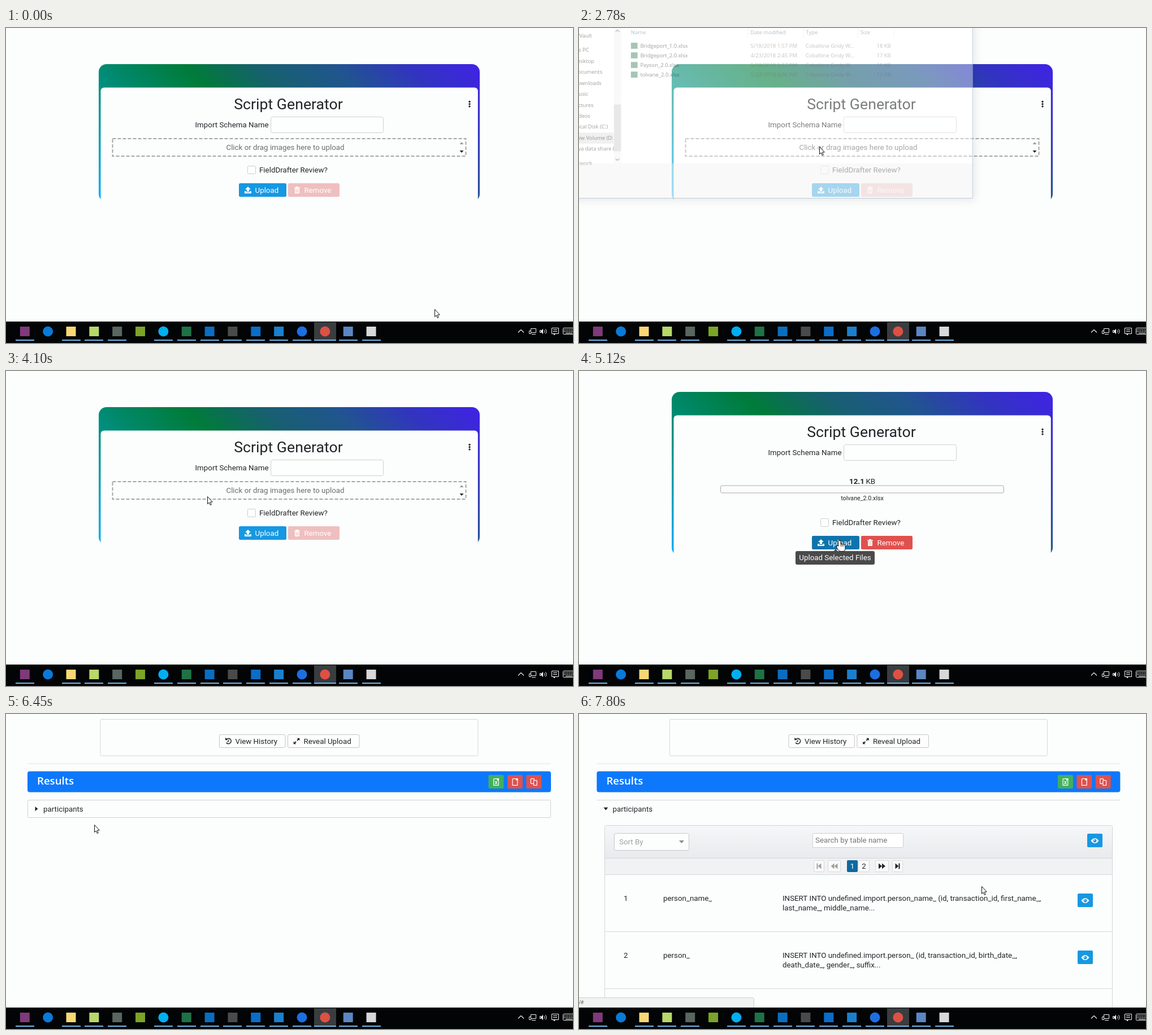
Animation, 1003 px wide and 558 px high, one loop 8 s. Source, as an HTML page with a canvas:

```html
<!DOCTYPE html>
<html lang="en">
<head>
<meta charset="utf-8">
<title>Script Generator</title>
<style>
html, body { margin: 0; width: 100%; height: 100%; overflow: hidden; background: #fcfefd; }
canvas { display: block; }
</style>
</head>
<body>
<canvas id="stage" width="1003" height="558"></canvas>
<script>
const g = document.getElementById('stage').getContext('2d');
const LOOP = 8000;
const ROBOTO = 'Roboto, sans-serif', UI = '"Open Sans", "Noto Sans", sans-serif';
const INK = '#212529', PAGE = '#fcfefd', BLUE = '#1698e2', RED = '#e0514e', GREEN = '#41b05c';
const FILE = 'tolvane_2.0.xlsx';

// moments of the story, in ms
const T = { dialog: 2780, hover: 3660, select: 3740, close: 3880, picked: 4120, tip: 5040,
  upload: 5340, done: 5640, row: 6560, link: 6830, expand: 7210 };

// cursor moves: when it starts and stops, where it goes, sideways bow, hand on arrival
const MOVES = [
  { from: 0, to: 1, x: 758, y: 498 },
  { from: 360, to: 1100, x: 817, y: 141, bow: -440, hand: true },
  { from: 1330, to: 1770, x: 426, y: 210, hand: true },
  { from: 2550, to: 2551, x: 426, y: 210 },
  { from: 2780, to: 3580, x: 140, y: 87 },
  { from: 3880, to: 4680, x: 520, y: 325 },
  { from: 4760, to: 5110, x: 461, y: 300, hand: true },
  { from: 5340, to: 5490, x: 654, y: 320 },
  { from: 5510, to: 5640, x: 641, y: 321 },
  { from: 6230, to: 6670, x: 61, y: 172, hand: true },
  { from: 7660, to: 7800, x: 712, y: 305 }
];

const clamp = v => Math.max(0, Math.min(1, v));
const mix = (a, b, k) => a + (b - a) * k;
const progress = (t, a, b) => clamp((t - a) / (b - a));
const easeOut = k => 1 - (1 - k) ** 2.6;

function text(s, x, y, { size = 13.34, color = INK, align = 'left', font = ROBOTO, weight = 400 } = {}) {
  g.font = `${weight} ${size}px ${font}`;
  g.fillStyle = color;
  g.textAlign = align;
  g.fillText(s, x, y);
}

function rect(x, y, w, h, color) {
  g.fillStyle = color;
  g.fillRect(x, y, w, h);
}

function box(x, y, w, h, r, fill, border, lw = 1) {
  const o = border ? lw / 2 : 0;
  g.beginPath();
  g.roundRect(x + o, y + o, w - 2 * o, h - 2 * o, r);
  if (fill) { g.fillStyle = fill; g.fill(); }
  if (border) { g.strokeStyle = border; g.lineWidth = lw; g.stroke(); }
}

function line(x0, y0, x1, y1, color, lw = 1) {
  g.beginPath();
  g.moveTo(x0, y0);
  g.lineTo(x1, y1);
  g.strokeStyle = color;
  g.lineWidth = lw;
  g.stroke();
}

function arc(x, y, r, a, b, color, lw = 1) {
  g.beginPath();
  g.arc(x, y, r, a, b);
  g.strokeStyle = color;
  g.lineWidth = lw;
  g.stroke();
}

function dot(x, y, r, color) {
  g.beginPath();
  g.arc(x, y, r, 0, 7);
  g.fillStyle = color;
  g.fill();
}

// triangle centred on x, y, pointing along quarter turns from right
function tri(x, y, turn, half, depth, color) {
  g.save();
  g.translate(x, y);
  g.rotate(turn * Math.PI / 2);
  g.beginPath();
  g.moveTo(-depth / 2, -half);
  g.lineTo(depth / 2, 0);
  g.lineTo(-depth / 2, half);
  g.fillStyle = color;
  g.fill();
  g.restore();
}

function chevron(x, y, turn, color = '#444', r = 3.5) {
  const d = turn === 3 ? -r / 2 : r / 2;
  line(x - r, y - d, x, y + d, color, 1.1);
  line(x, y + d, x + r, y - d, color, 1.1);
}

// icons are drawn around 0, 0
const icons = {
  upload() {
    tri(0, -3.5, 3, 5, 5, '#fff');
    rect(-2, -1, 4, 4, '#fff');
    rect(-6, 4, 12, 2, '#fff');
    for (const x of [-6, 3]) rect(x, 2, 3, 3, '#fff');
  },
  trash() {
    rect(-5, -4.5, 10, 1.6, '#fff');
    rect(-2, -6, 4, 2, '#fff');
    box(-4, -2.5, 8, 8.5, 1, '#fff');
    for (const x of [-2, 0, 2]) line(x, -1, x, 4.5, 'rgba(220,80,80,.5)', .8);
  },
  history() {
    arc(.5, 0, 4.7, -2.6, 2.5, INK, 1.6);
    tri(-4, -3, 1.5, 3, 3.5, INK);
    line(.5, -2.5, .5, 1, INK, 1.2);
    line(.5, .8, -1.8, .8, INK, 1.2);
  },
  expand() {
    for (const d of [-1, 1]) {
      line(d, -d, 4 * d, -4 * d, INK, 1.8);
      tri(4.2 * d, -4.2 * d, d > 0 ? -.5 : 1.5, 3.2, 3.2, INK);
    }
  },
  page() {
    box(-5, -6.5, 10, 13, 1, null, '#fff', 1.2);
    rect(1.5, -6.5, 3.5, 3.5, '#fff');
  },
  sheet() {
    icons.page();
    for (const d of [-2, 2]) line(-d, -2, d, 4, '#fff', 1.3);
  },
  copy() {
    box(-6, -6.5, 7, 10, 1, null, '#fff', 1.2);
    box(-1, -3.5, 7, 10, 1, RED, '#fff', 1.2);
  },
  eye() {
    g.beginPath();
    g.moveTo(-7, 0);
    g.quadraticCurveTo(0, -9, 7, 0);
    g.quadraticCurveTo(0, 9, -7, 0);
    g.fillStyle = '#fff';
    g.fill();
    dot(0, 0, 2.9, BLUE);
    dot(-1, -1, 1, '#fff');
  }
};

function icon(name, x, y) {
  g.save();
  g.translate(x, y);
  icons[name]();
  g.restore();
}

function iconButton(x, y, color, name) {
  box(x, y, 27, 24, 2, color);
  icon(name, x + 13.5, y + 12.5);
}

function labelButton(x, y, w, label, name, fill, color, border) {
  box(x, y, w, 24, 2.5, fill, border);
  icon(name, x + 16, y + 12);
  text(label, x + 28.5, y + 16.8, { color });
}

// 45 degree gradient across the card box
function cardFill(x, y, w, h) {
  const k = (w + h) / 4, cx = x + w / 2, cy = y + h / 2;
  const fill = g.createLinearGradient(cx - k, cy + k, cx + k, cy - k);
  const colors = ['#00adff', '#009ca4', '#00886a', '#007b39', '#17606f', '#20558e', '#3234c0', '#4022e6'];
  colors.forEach((c, i) => fill.addColorStop(i / (colors.length - 1), c));
  return fill;
}

function card(top, inner, bottom, mode, t) {
  const h = bottom - top, picked = mode === 'picked', closing = mode === 'closing';
  if (h <= 2) return;
  g.save();
  g.beginPath();
  g.rect(160, 0, 682, bottom);
  g.clip();
  box(164, top, 674, closing ? h + 20 : h, 14, cardFill(164, top, 674, h));
  box(167.5, inner + .6, 667.3, Math.max(20, h), 6, PAGE);
  g.translate(0, inner - 105);
  text('Script Generator', 499.5, 144, { size: 26.67, align: 'center' });
  for (const d of [-1, 0, 1]) dot(820, 134.7 + 4.2 * d, 1.7, INK);
  text('Import Schema Name', 334.5, 176);
  box(468, 157, 200, 29, 3, '#fdfefe', '#cfcfcf');
  if (picked) fileInfo(t); else dropZone(closing);
  if (picked) g.translate(0, 44);
  box(427, 244, 15, 15, 2, '#fff', '#cbcbcb');
  text('FieldDrafter Review?', 448, 256);
  labelButton(412, 275, 84, 'Upload', 'upload', picked && t >= T.tip ? '#1074ac' : BLUE, '#fff');
  labelButton(499, 275, 91, 'Remove', 'trash', picked ? RED : '#efbfbf', '#fff');
  g.restore();
}

function fileInfo(t) {
  text('12.1', 478, 227, { weight: 700 });
  text('KB', 507.5, 227);
  const s = mix(1.066, 1, progress(t, 4740, 4900));
  box(501 - 251 * s, 236.5 - 7 * s, 502 * s, 14 * s, 3, '#fcfcfc', '#a9a9a9');
  text(FILE, 501, 256, { size: 10.67, align: 'center' });
}

function dropZone(active) {
  if (active) rect(189, 196, 609, 31, '#ececec');
  g.setLineDash([6, 3]);
  box(187.5, 195, 627, 33, 0, null, '#a6a6a6', 2);
  g.setLineDash([]);
  text('Click or drag images here to upload', 494, 216, { color: '#6c6c6c', align: 'center' });
  tri(806, 204, 3, 3.5, 4, '#9a9a9a');
  tri(806, 219, 1, 3.5, 4, '#222');
}

function tooltip() {
  tri(454, 317.5, 3, 4, 4, '#4a4a4a');
  box(383, 319, 140, 24, 3, '#4a4a4a');
  text('Upload Selected Files', 453, 335, { color: '#fff', align: 'center' });
}

function pagerButton(x, w, back, end) {
  const c = x + w / 2, d = back ? -1 : 1, color = back ? '#a0a0a0' : INK;
  box(x, 259, w, 21, 2, '#fafafa', '#d8d8d8');
  for (const o of end ? [-d] : [-3, 3]) tri(c + o, 269.5, back ? 2 : 0, 5, 6, color);
  if (end) rect(c + 3 * d - 1, 264.5, 2, 10, color);
}

function table(reveal) {
  const rows = [
    ['person_name_', 'INSERT INTO undefined.import.person_name_ (id, transaction_id, first_name_,', 'last_name_, middle_name...'],
    ['person_', 'INSERT INTO undefined.import.person_ (id, transaction_id, birth_date_,', 'death_date_, gender_, suffix...'],
    ['', '', '']
  ];
  const head = g.createLinearGradient(0, 198, 0, 255);
  head.addColorStop(0, '#f6f7f8');
  head.addColorStop(1, '#e9eaed');
  g.save();
  g.beginPath();
  g.rect(0, 184, 1003, 336 * reveal);
  g.clip();
  box(45, 197, 899, 400, 2, PAGE, '#d2d4d6');
  rect(46, 198, 897, 57, head);
  rect(46, 255, 897, 30, '#f1f2f4');
  rect(45, 255, 899, 1, '#d4d6d8');
  box(62, 211, 133, 31, 3, '#fcfdfd', '#c8c8c8');
  text('Sort By', 71, 231, { color: '#a0a0a0' });
  tri(181.5, 226.5, 1, 4.5, 5, '#8b8b8b');
  box(413, 211, 161, 26, 2, '#fff', '#cfcfcf');
  text('Search by table name', 418, 228, { color: '#777' });
  iconButton(899, 212, BLUE, 'eye');
  pagerButton(415, 19, true, true);
  pagerButton(440, 23, true, false);
  box(474, 259, 19, 21, 2, '#10689f');
  text('1', 483.5, 274, { color: '#fff', align: 'center' });
  box(494, 259, 20, 21, 2, '#fafafa', '#d8d8d8');
  text('2', 504, 274, { align: 'center' });
  pagerButton(524, 24, false, false);
  pagerButton(554, 19, false, true);
  rows.forEach(([name, sql, more], i) => {
    const y = 284 + 101 * i;
    rect(45, y, 899, 1, '#d4d6d8');
    text(i + 1, 79, y + 47);
    text(name, 149, y + 47);
    text(sql, 360, y + 47);
    text(more, 360, y + 63.5);
    iconButton(882, y + 34, BLUE, 'eye');
  });
  g.restore();
}

function results(y, t) {
  const open = t >= T.expand, scrollbar = open || t < T.upload + 50;
  g.save();
  g.translate(scrollbar ? -6.6 : 0, y);
  box(166.5, 0, 669, 65.5, 2, PAGE, '#d6d6d6');
  labelButton(377, 27, 117.5, 'View History', 'history', '#fdfdfd', INK, '#c4c4c4');
  labelButton(498, 27, 127.5, 'Reveal Upload', 'expand', '#fdfdfd', INK, '#c4c4c4');
  rect(38, 78.5, 926, 1, '#e4e5e5');
  box(38, 92.5, 926, 37, 4, '#0e78fc');
  text('Results', 55, 115.5, { size: 18.6, color: '#fff', font: UI, weight: 600 });
  ['sheet', 'page', 'copy'].forEach((name, i) => iconButton(853.5 + 33.4 * i, 99, i ? RED : GREEN, name));
  if (open) rect(38, 143, 926, 1, '#d6d6d6');
  else box(38, 143, 926, 32, 2, t >= T.row ? '#f0f0f0' : '#fcfdfd', '#cfd0d0');
  tri(54, 159, open ? 1 : 0, 4, 5, INK);
  text('participants', 66, 163.5);
  g.restore();
  if (open) table(progress(t, T.expand - 60, T.expand + 200));
}

const ui = (s, x, y, color = '#111', align = 'left') => text(s, x, y, { size: 9.7, color, align, font: UI });

// the shadow stays outside the window, so a fading window is not darkened by it
function windowFrame(right, bottom) {
  g.save();
  g.beginPath();
  g.rect(-900, -900, 2800, 2800);
  g.rect(-200, -200, right + 200, bottom + 200);
  g.clip('evenodd');
  g.shadowColor = 'rgba(0,0,0,.2)';
  g.shadowBlur = 14;
  g.shadowOffsetX = g.shadowOffsetY = 4;
  rect(-200, -200, right + 200, bottom + 200, '#fff');
  g.restore();
  rect(-200, -200, right + 200, bottom + 200, '#fff');
}

function folders() {
  const groups = [
    ['SkyVault'],
    ['This PC', 'Desktop', 'Documents', 'Downloads', 'Music', 'Pictures', 'Videos',
      'Local Disk (C:)', 'New Volume (D:', 'Java data share ('],
    ['Network']
  ];
  rect(-200, 188, 254, 20, '#d9d9d9');
  let y = 15;
  for (const group of groups) {
    group.forEach((name, i) => { ui(name, i ? -18 : -23, y); y += 20; });
    y += 6;
  }
  rect(55, -20, 13, 264, '#f0f0f0');
  rect(55, 137, 13, 85, '#cdcdcd');
  chevron(61.5, 3, 3);
  chevron(61.5, 237, 1);
}

function files(t) {
  const cols = { 'Name': 86, 'Date modified': 303, 'Type': 404, 'Size': 503 };
  const list = [
    ['Bridgeport_1.0.xlsx', '5/18/2018 1:57 PM', '18 KB'],
    ['Bridgeport_2.0.xlsx', '4/23/2018 2:45 PM', '17 KB'],
    ['Payson_2.0.xlsx', '5/18/2018 1:57 PM', '11 KB'],
    [FILE, '5/22/2018 4:06 PM', '12 KB']
  ];
  for (const [name, x] of Object.entries(cols)) {
    ui(name, x, 9, '#536480');
    rect(x - 5, -5, 1, 21, x < 100 ? '#fff' : '#e4e4e4');
  }
  rect(564, -5, 1, 21, '#e4e4e4');
  if (t >= T.hover) rect(83, 73, 479, 18.5, t >= T.select ? '#cce8ff' : '#e5f3ff');
  list.forEach(([name, date, size], i) => {
    const y = 33.5 + 17.5 * i;
    rect(86, y - 9, 12, 11, '#217346');
    ui(name, 103, y);
    ui(date, 303.5, y, '#6d6d6d');
    ui('Cobaltine Gridy W...', 403.5, y, '#6d6d6d');
    ui(size, 558.5, y, '#6d6d6d', 'right');
  });
}

function fileControls(t) {
  ui('File name:', 91.5, 265, '#111', 'right');
  box(96, 251.5, 430, 20, 0, '#fff', '#0078d7');
  if (t >= T.select) ui(FILE, 100, 265);
  chevron(518, 262, 1);
  box(536, 251.5, 157, 19.5, 0, '#e3e3e3', '#adadad');
  ui('Custom Files', 539.5, 265);
  chevron(685, 261.5, 1);
  box(537, 276.5, 72, 20, 0, '#e1e1e1', '#0078d7', 2);
  ui('Open', 566.5, 290, '#111', 'center');
  rect(597, 279, 1, 15, '#333');
  tri(602.5, 287, 1, 4, 4.5, '#111');
  box(620, 276.5, 72, 20, 0, '#e1e1e1', '#adadad');
  ui('Cancel', 656, 290, '#111', 'center');
  for (let i = 0; i < 3; i++)
    for (let j = 0; j <= i; j++) rect(704 - 3 * j, 298.5 + 3 * i, 1.5, 1.5, '#b4b4b4');
}

function dialog(t) {
  const closing = t >= T.close;
  const alpha = closing ? 1 - progress(t, T.close - 20, T.picked - 40) : progress(t, T.dialog - 80, T.dialog + 120);
  const s = .955 + .045 * alpha;
  if (!alpha) return;
  g.save();
  g.globalAlpha = alpha;
  g.translate(305, 85);
  g.scale(s, s);
  g.translate(-305, -85);
  windowFrame(707.5, 308);
  folders();
  files(t);
  rect(-200, 244, 907, 64, '#f0f0f0');
  if (t >= T.dialog + 60) fileControls(t);
  box(-200, -200, 907.5, 508, 0, null, closing || alpha === 1 ? '#7b8694' : '#5f83b8');
  g.restore();
}

function taskbar() {
  const apps = ['#80397b', '#0a7ad8', '#f8d775', '#b8d86a', '#5a6660', '#7ba428', '#00aff0', '#1f7246',
    '#0a6ec0', '#4a4a4a', '#0a6ec8', '#1b7fcc', '#1c6fe0', '#dd5144', '#5b86c4', '#d8d8d8'];
  const round = [1, 6, 12, 13], idle = [1, 5], active = 13;
  rect(0, 520, 1003, 38, '#020405');
  rect(545, 521, 39, 33, '#393d40');
  apps.forEach((color, i) => {
    const x = 33.3 + 40.85 * i, w = i === active ? 39 : 33;
    if (round.includes(i)) dot(x, 537.5, 9, color);
    else rect(x - 8.5, 529, 17, 17, color);
    if (!idle.includes(i)) rect(Math.round(x - w / 2), 552, w, 2, '#76b9ed');
  });
  tray('#f4f4f4');
}

function tray(color) {
  chevron(911, 537, 3, color, 5);
  box(928, 532, 10, 8, 0, null, color);
  box(925, 536, 4, 6, 0, null, color);
  line(930, 542.5, 937, 542.5, color);
  box(944, 535, 3, 5, 0, null, color);
  tri(948, 537.5, 2, 5, 4, color);
  for (const r of [3, 6]) arc(950, 537.5, r, -.8, .8, color);
  box(965, 531, 13, 11, 0, null, color);
  tri(970, 543, 1, 2, 3, color);
  for (const y of [534.5, 537.5]) line(968, y, 975, y, color);
  box(985, 531, 22, 12, 1, null, color);
  for (let x = 987; x < 1003; x += 3) for (const y of [534, 537]) rect(x, y, 1.5, 1.5, color);
  rect(990, 540, 12, 1, color);
}

function statusBubble() {
  box(-3, 502, 313, 24, 3, '#f1f2f2', '#cdcfcf');
  text('/#', 0, 514, { size: 8.5, color: '#555', font: UI });
}

function hand() {
  const shape = new Path2D();
  shape.roundRect(-1.5, .5, 3, 12, 1.5);
  shape.roundRect(-1.5, 7.5, 11, 11.5, [1, 3, 4, 4]);
  shape.ellipse(-2, 13.5, 2, 4, -.5, 0, 7);
  g.strokeStyle = '#111';
  g.lineWidth = 2;
  g.stroke(shape);
  g.fillStyle = '#fff';
  g.fill(shape);
  for (const x of [2, 4.5, 7]) line(x, 8, x, 11, '#111', .8);
}

function arrow() {
  g.beginPath();
  g.moveTo(.5, .5);
  g.lineTo(.5, 13.5);
  g.lineTo(3.3, 11);
  g.lineTo(5.3, 15.5);
  g.lineTo(7.3, 14.7);
  g.lineTo(5.3, 10.2);
  g.lineTo(9.3, 10);
  g.closePath();
  g.fillStyle = '#fff';
  g.fill();
  g.strokeStyle = '#111';
  g.lineWidth = 1;
  g.stroke();
}

function cursor(t) {
  const i = MOVES.findLastIndex(m => t >= m.from), move = MOVES[i], last = MOVES[i - 1] || move;
  const k = easeOut(progress(t, move.from, move.to));
  const x = mix(last.x, move.x, k) + (move.bow || 0) * Math.sin(Math.PI * k);
  g.save();
  g.translate(Math.round(x), Math.round(mix(last.y, move.y, k)));
  if (move.hand && k > .97) hand(); else arrow();
  g.restore();
}

function draw(t) {
  rect(0, 0, 1003, 558, PAGE);
  if (t < T.picked) card(64, 105, 308, 'empty', t);
  else if (t < T.upload) {
    card(37, 78, 327, 'picked', t);
    if (t >= T.tip) tooltip();
  } else {
    const k = progress(t, T.upload, T.done), bottom = mix(281, -32, k ** 3.58);
    card(37, 78 + 169 * k * k, bottom, 'closing', t);
    results(bottom + 41, t);
  }
  if (t >= T.dialog && t < T.picked) dialog(t);
  if (t >= T.link) statusBubble();
  taskbar();
  cursor(t);
}

const start = performance.now();
function tick() {
  draw((performance.now() - start) % LOOP);
  requestAnimationFrame(tick);
}
tick();
</script>
</body>
</html>
```
